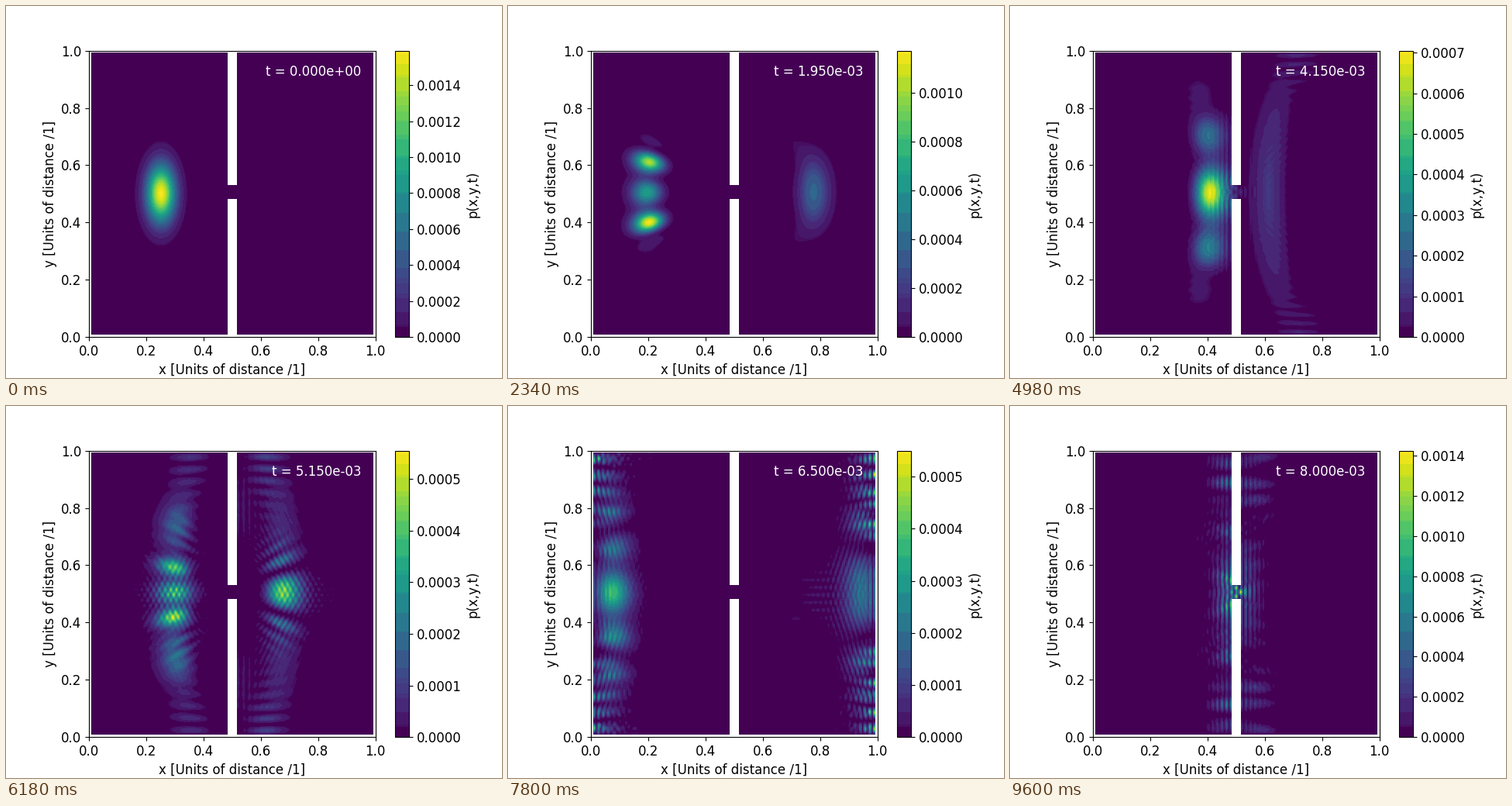
Recreate the animation shown at these times as a matplotlib script. Size 640 by 480 pixels, loop 9.66 s.

```python
import numpy as np
import matplotlib.pyplot as plt
from matplotlib.animation import FuncAnimation
from matplotlib.colors import ListedColormap

N = 201            # grid points per side
FRAMES = 161
FRAME_DT = 5e-5    # simulated time per frame, two Crank-Nicolson steps
DEGREE = 26        # terms of the Chebyshev propagator


def make_domain():
    """1 where the wave may live, 0 on the box edge and in the slit wall."""
    free = np.zeros((N, N))
    free[1:-1, 1:-1] = 1
    free[:96, 98:103] = 0
    free[107:, 98:103] = 0
    return free


def first_wave(free):
    x = np.linspace(0, 1, N)[None, :]
    y = np.linspace(0, 1, N)[:, None]
    u = np.exp(-(x - 0.25) ** 2 / (2 * 0.05 ** 2)
               - (y - 0.5) ** 2 / (2 * 0.1 ** 2) + 200j * x) * free
    return u / np.sqrt(np.sum(np.abs(u) ** 2))


def propagator_coefficients():
    """Chebyshev series of ((1 - iz) / (1 + iz))^2 for z in [0, 4]."""
    nodes = 96
    theta = (np.arange(nodes) + 0.5) * np.pi / nodes
    z = 2 + 2 * np.cos(theta)
    f = ((1 - 1j * z) / (1 + 1j * z)) ** 2
    c = 2 / nodes * np.cos(np.outer(np.arange(DEGREE), theta)) @ f
    c[0] /= 2
    return c


def simulate():
    """Probability density for every frame, NaN inside the walls."""
    free = make_domain()
    weight = -0.25 * free[1:-1, 1:-1]
    coef = propagator_coefficients()

    def hop(u):
        v = np.zeros_like(u)
        v[1:-1, 1:-1] = weight * (u[:-2, 1:-1] + u[2:, 1:-1]
                                  + u[1:-1, :-2] + u[1:-1, 2:])
        return v

    def advance(u):
        prev, cur = u, hop(u)
        total = coef[0] * prev + coef[1] * cur
        for c in coef[2:]:
            prev, cur = cur, 2 * hop(cur) - prev
            total += c * cur
        return total

    u = first_wave(free)
    density = []
    for _ in range(FRAMES):
        density.append(np.where(free > 0, np.abs(u) ** 2, np.nan))
        u = advance(u)
    return density


def stepped_viridis():
    """Viridis merged into flat bands, one per coarse RGB cell."""
    rgb = plt.get_cmap("viridis")(np.arange(256), bytes=True)[:, :3].astype(int)
    cells = rgb // [32, 16, 32]
    keys = cells @ [256, 16, 1]
    colors = np.array([rgb[keys == k].mean(axis=0) for k in keys])
    colors[keys == keys[0]] = rgb[0]
    return ListedColormap(colors / 255)


density = simulate()
peaks = [np.nanmax(p) for p in density]

plt.rcParams["font.family"] = "DejaVu Sans"
plt.rcParams["font.size"] = 12

fig = plt.figure(figsize=(6.4, 4.8), dpi=100)
ax = fig.gca()
img = ax.imshow(density[0], extent=[0, 1, 0, 1], origin="lower",
                cmap=stepped_viridis(), vmin=0, vmax=peaks[0])
ax.set_xlabel("x [Units of distance /1]")
ax.set_ylabel("y [Units of distance /1]")
cbar = fig.colorbar(img, ax=ax)
cbar.set_label("p(x,y,t)")
clock = ax.text(0.95, 0.95, "", color="white", ha="right", va="top")


def update(i):
    img.set_data(density[i])
    img.set_clim(0, peaks[i])
    clock.set_text(f"t = {i * FRAME_DT:.3e}")
    return img, clock


anim = FuncAnimation(fig, update, frames=FRAMES, interval=60,
                     repeat=True, repeat_delay=0, blit=False)
plt.show()
```
